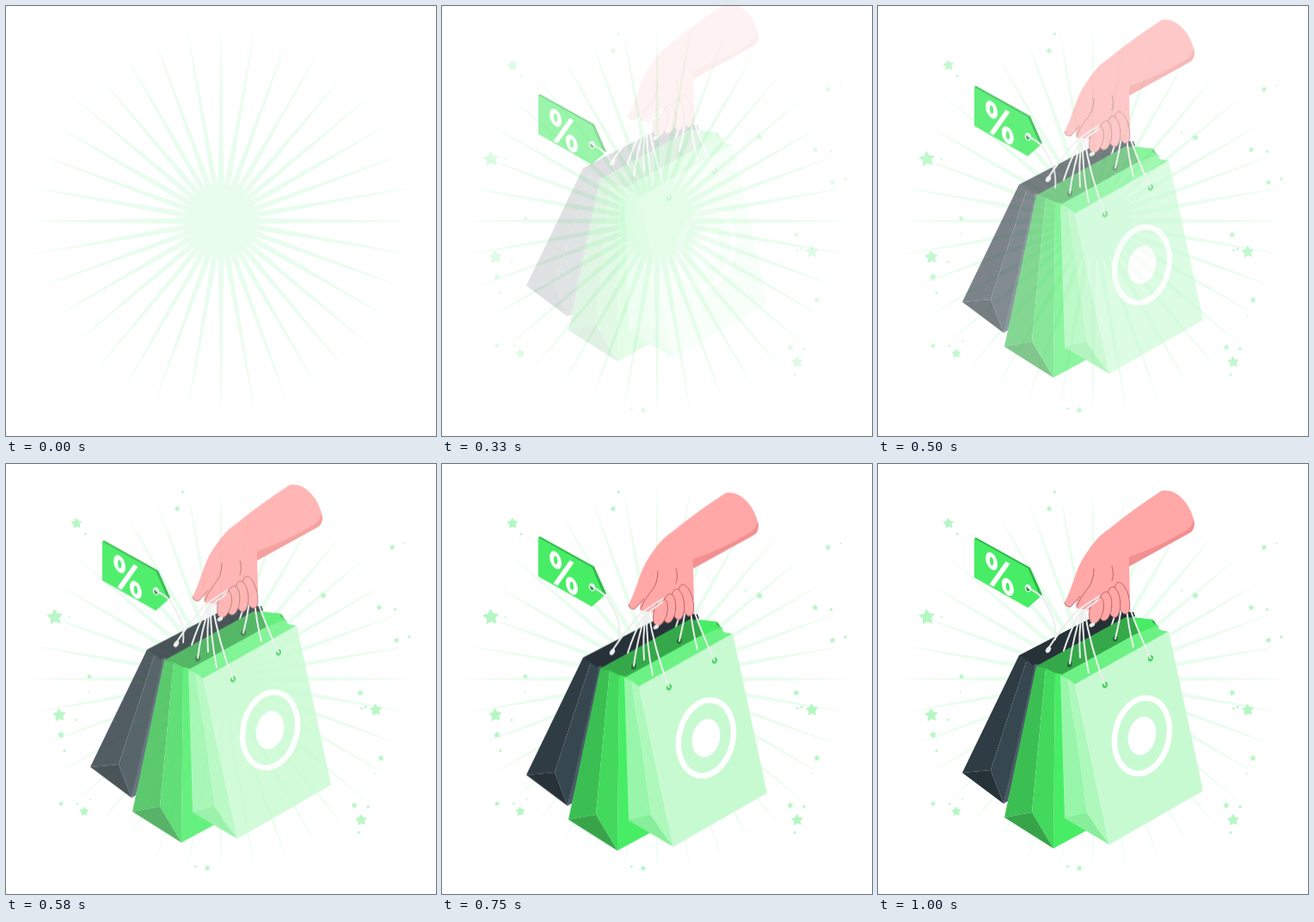
Write an HTML page with a canvas that moves like this. It is 500 px wide and 500 px high and loops after 1040 ms.

```html
<!DOCTYPE html>
<html lang="en">
<head>
<meta charset="utf-8">
<title>Shopping bags</title>
<style>
html, body { margin: 0; width: 100%; height: 100%; overflow: hidden; background: #fff; }
canvas { display: block; width: 500px; height: 500px; }
</style>
</head>
<body>
<canvas id="stage" width="500" height="500"></canvas>
<script>
const SIZE = 500, LOOP = 1040, DELAY = 190, RISE = 810, PAD = 50;
const TURN = Math.PI * 2;
const CORD = '#eeeeee';
const stage = document.getElementById('stage').getContext('2d');

// larger stars: x, y, radius
const STARS = [[57, 178, 9.8], [62, 292, 8.2], [430, 286, 7.7], [413, 414, 7.3], [82, 69, 6.8],
  [91, 404, 6], [64, 315, 4.3], [369, 153, 4.2], [436, 342, 4], [412, 266, 4], [405, 397, 3.9],
  [234, 470, 3.8], [454, 205, 3.7], [434, 167, 3.7], [449, 97, 3.7], [199, 52, 3.6],
  [64, 395, 3.3], [97, 247, 3.2]];

const bezier = (s, a, b) => 3 * (1 - s) ** 2 * s * a + 3 * (1 - s) * s * s * b + s ** 3;

// ease with an overshoot, like cubic-bezier(.32, 0, .42, 1.45)
function progress(t) {
  const x = (t - DELAY) / RISE;
  if (x <= 0) return 0;
  if (x >= 1) return 1;
  let lo = 0, hi = 1;
  for (let i = 0; i < 20; i++) {
    const mid = (lo + hi) / 2;
    if (bezier(mid, .32, .42) < x) lo = mid; else hi = mid;
  }
  return bezier(lo, 0, 1.45);
}

function seeded(seed) {
  return () => (seed = seed * 16807 % 2147483647) / 2147483647;
}

function layer(draw) {
  const c = document.createElement('canvas');
  c.width = SIZE;
  c.height = SIZE + PAD * 2;
  const g = c.getContext('2d');
  g.translate(0, PAD);
  g.lineCap = g.lineJoin = 'round';
  draw(g);
  return c;
}

function poly(g, color, ...points) {
  g.beginPath();
  for (const [x, y] of points) g.lineTo(x, y);
  g.closePath();
  g.fillStyle = color;
  g.fill();
}

function shape(g, color, path) {
  g.fillStyle = color;
  g.fill(new Path2D(path));
}

function line(g, color, width, path) {
  g.strokeStyle = color;
  g.lineWidth = width;
  g.stroke(new Path2D(path));
}

function oval(g, color, x, y, rx, ry = rx, turn = 0, width = 0) {
  g.beginPath();
  g.ellipse(x, y, rx, ry, turn, 0, TURN);
  g.fillStyle = g.strokeStyle = color;
  g.lineWidth = width;
  if (width) g.stroke(); else g.fill();
}

function drawRays(g) {
  const color = '#e9fdee';
  g.translate(250, 250);
  for (let i = 0; i < 36; i++) {
    poly(g, color, [0, -3.6], [42, -3.4], [230, 0], [42, 3.4], [0, 3.6]);
    g.rotate(TURN / 36);
  }
  oval(g, color, 0, 0, 43);
}

// every star has a small dot close by
function drawStars(g) {
  const color = '#b5f7c3', random = seeded(11);
  for (const [x, y, r] of STARS) {
    const points = [];
    for (let k = 0; k < 10; k++) {
      const a = k * TURN / 10 - 1.65, d = k % 2 ? r * .54 : r;
      points.push([x + d * Math.cos(a), y + d * Math.sin(a)]);
    }
    poly(g, color, ...points);
    const a = random() * TURN, d = 13 + random() * 8;
    oval(g, color, x + d * Math.cos(a), y + d * Math.sin(a), .8 + random());
  }
}

// folded side of a bag: top corners a and b, then left, fold and bottom corners
function side(g, a, b, left, fold, bottom, colors) {
  const mid = [(a[0] + b[0]) / 2, (a[1] + b[1]) / 2 - 1.5];
  poly(g, colors[0], a, mid, fold, left);
  poly(g, colors[1], mid, b, bottom, fold);
  poly(g, colors[2], left, fold, bottom);
}

function drawDarkBag(g) {
  poly(g, '#263238', [164, 222.5], [240, 183], [264, 171], [297, 172], [299, 177], [184, 240]);
  poly(g, '#4b5b68', [178, 236], [184, 232], [190, 236], [151, 392], [146, 395]);
  side(g, [164, 222.5], [182, 236], [98, 359], [131, 356], [146, 395],
    ['#2f3c44', '#37474f', '#263238']);
}

function drawGreenBag(g) {
  poly(g, '#35a94a', [184, 235], [288, 178], [320, 181], [326, 190], [215, 250]);
  poly(g, '#47ed65', [296, 178], [320, 181], [319, 184], [327, 189], [304, 198]);
  poly(g, '#47ed65', [206, 243], [216, 245], [252, 421], [204, 447]);
  side(g, [184, 235], [206, 243], [147, 411], [179, 405], [204, 447],
    ['#3cbf52', '#43d95d', '#37a44a']);
}

function drawLightBag(g) {
  poly(g, '#6cf284', [212, 246], [299, 198], [324, 188], [328, 193], [338, 195], [229, 258]);
  side(g, [212, 246], [229, 256], [217, 412], [242, 406], [269, 442.5],
    ['#98f6aa', '#aef8bc', '#88ee9b']);
  poly(g, '#c8fad2', [229, 256], [338, 194.5], [378, 380], [269, 442.5]);
  oval(g, '#fff', 307, 316, 31.3, 44.4, .22, 6.5);
  oval(g, '#fff', 307, 316, 16, 22.6, .22);
}

function drawHand(g) {
  const skin = '#ffa8a7', crease = '#a9585c';
  shape(g, skin, 'M330 31C349 28 364 48 368 68C368 75 365 78 360 81L292 119L293 155L262 172L231 168'
    + 'Q229 162 232 158L224 166Q217 167 217 161C227 143 229 122 242 104C250 92 257 83 268 76'
    + 'Q296 53 330 31Z');
  shape(g, '#f28f8f', 'M292 108Q328 96 360 76Q366 71 367 64Q370 77 361 81L292 119Z');
  line(g, crease, .8, 'M251 122Q251 138 242 147Q234 157 231 166M272 119Q275 128 272 136');
  line(g, crease, .8, 'M217 161Q219 167 224 166L235 154');
  for (let i = 0; i < 4; i++) {
    const finger = [284 - i * 10, 156 + i * 4.7, 7.8, 19 - i, .17 * i - .25];
    oval(g, skin, ...finger);
    oval(g, crease, ...finger, .8);
  }
}

// curved cord between two points, sagging sideways by bend
function cord(g, x0, y0, x1, y1, bend) {
  line(g, CORD, 2, `M${x0} ${y0}Q${(x0 + x1) / 2 + bend} ${(y0 + y1) / 2} ${x1} ${y1}`);
}

function hole(g, color, x, y) {
  oval(g, color, x, y, 2.9, 3.7, .35);
}

function drawBags(g) {
  drawDarkBag(g);
  cord(g, 276, 174, 270, 193, 0);
  drawGreenBag(g);
  hole(g, '#256f35', 223, 233);
  hole(g, '#256f35', 276, 203);
  cord(g, 283, 167, 276, 203, 1);
  drawLightBag(g);
  hole(g, '#3fd65b', 264, 257);
  hole(g, '#3fd65b', 317, 226);
  cord(g, 289, 166, 297, 213, -2);
  cord(g, 292, 165, 317, 226, -2);
  drawHand(g);
  oval(g, CORD, 249, 187, 3.5, 2.2, -.5);
  cord(g, 257, 154, 229, 173, -2);
  cord(g, 256, 158, 233, 176, -1);
  cord(g, 229, 173, 197, 216, -2);
  cord(g, 233, 176, 216, 217, -2);
  cord(g, 237, 171, 223, 232, -3);
  cord(g, 237, 171, 235, 225, -3);
  cord(g, 238, 171, 245, 243, -4);
  cord(g, 240, 170, 264, 257, -5);
  oval(g, CORD, 198, 216, 2.6, 4, .6);
}

function drawTag(g) {
  poly(g, '#2fb84a', [112, 86.5], [114, 85.5], [177, 120.5], [191, 152], [174, 167]);
  poly(g, '#47ed65', [112, 86.5], [174.5, 121.5], [188.5, 154.5], [174, 167], [112, 132]);
  g.save();
  g.transform(1, .55, 0, 1, 141.5, 128);
  for (const k of [-1, 1]) oval(g, '#fff', 9.4 * k, 9.8 * k, 4.6, 7.3, 0, 4.8);
  poly(g, '#fff', [7, -18.5], [12, -18.5], [-7, 18.5], [-12, 18.5]);
  g.restore();
  oval(g, '#fff', 174.5, 144.5, 3.6, 4.6, -.3);
  oval(g, '#2a8c3e', 174.3, 145, 2, 3, -.3);
  line(g, CORD, 2, 'M174 143C181 149 189 150 194 160C202 175 208 184 206 204');
}

const [rays, stars, bags, tag] = [drawRays, drawStars, drawBags, drawTag].map(layer);

function put(img, y = 0, alpha = 1) {
  stage.globalAlpha = Math.min(1, alpha);
  stage.drawImage(img, 0, y - PAD);
}

function render(t) {
  const p = progress(t);
  stage.globalAlpha = 1;
  stage.fillStyle = '#fff';
  stage.fillRect(0, 0, SIZE, SIZE);
  put(rays);
  if (!p) return;
  put(stars, 0, p ** .45);
  put(bags, -40 * (1 - p), p);
  put(tag, 20 * (1 - p), p ** .32);
}

const start = performance.now();
function tick() {
  render((performance.now() - start) % LOOP);
  requestAnimationFrame(tick);
}
tick();
</script>
</body>
</html>
```
